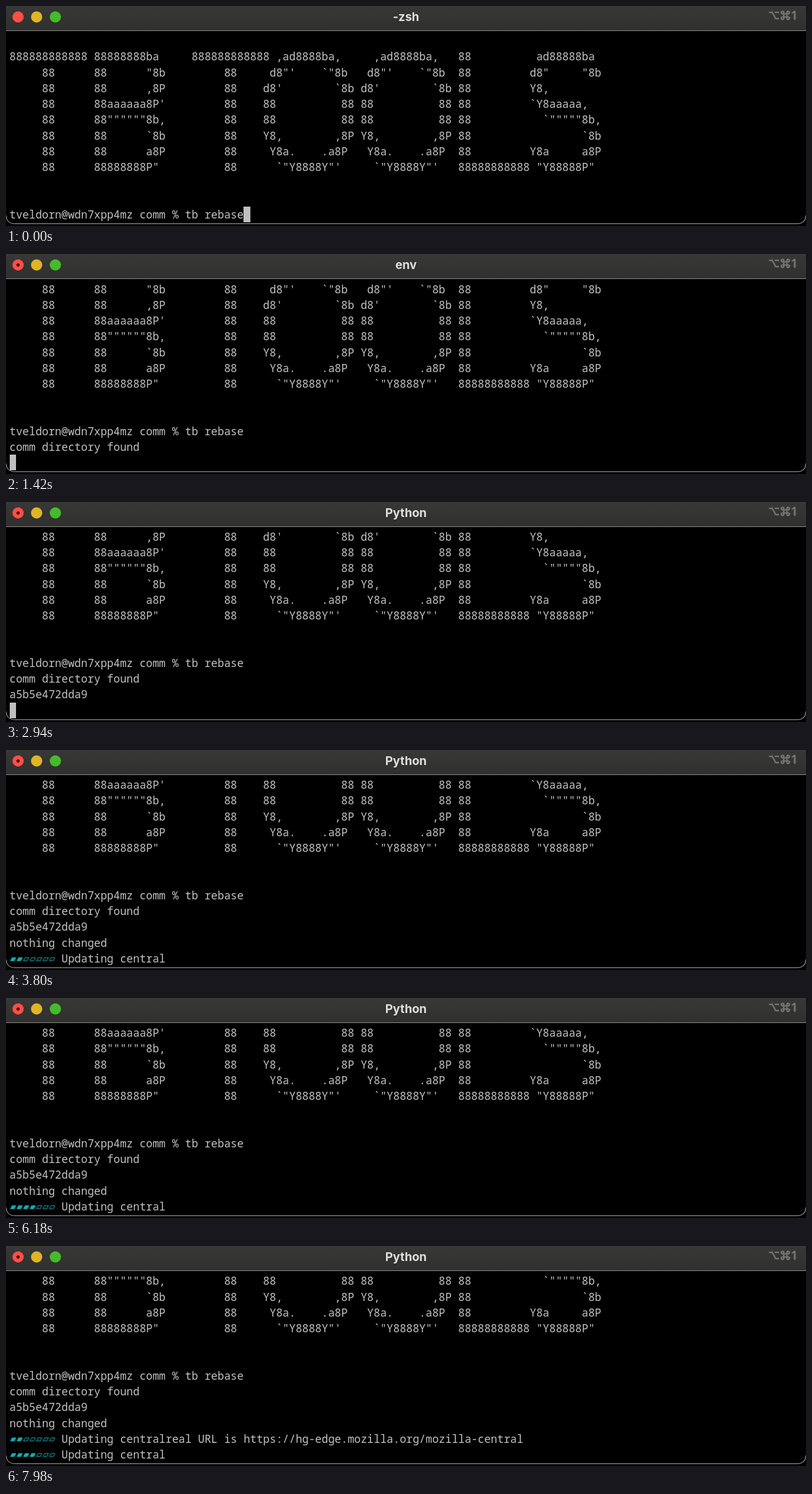
Write an HTML page that moves like this. It is 1280 by 352 pixels and loops after 8 s.

```html
<!DOCTYPE html>
<html lang="en">
<head>
<meta charset="utf-8">
<title>Terminal</title>
<style>
  :root { --row: 25.25px; --grey: #c2c2c2; --cyan: #14a9b5; }
  html, body { margin: 0; width: 100%; height: 100%; overflow: hidden; background: #000; }
  #stage { position: relative; width: 1280px; height: 352px; overflow: hidden; background: #000; }
  #frame { position: absolute; inset: 0; }
  #frame text { font-family: Inter, "Open Sans", sans-serif; font-weight: 700; }
  #term {
    position: absolute; left: 5.5px; top: 43px;
    width: 1268px; height: calc(12 * var(--row)); overflow: hidden;
    font: 17.35px/var(--row) "Noto Sans Mono", "DejaVu Sans Mono", monospace;
    color: var(--grey);
  }
  pre { margin: 0; font: inherit; font-variant-ligatures: none; }
  #tail { position: absolute; left: 0; bottom: 0; width: 100%; height: var(--row); }
  #cursor { position: absolute; top: 0; width: 10.5px; height: 100%; background: #bfbfbf; }
  .bar { width: 72.87px; height: 7px; vertical-align: 2px; overflow: visible; }
  .bar path { fill: none; stroke: var(--cyan); stroke-width: 1; }
  .bar path.on { fill: var(--cyan); }
</style>
</head>
<body>
<div id="stage">
  <svg id="frame" viewBox="0 0 1280 352">
    <defs>
      <linearGradient id="chrome" x2="0" y2="1">
        <stop stop-color="#383836"/>
        <stop offset="1" stop-color="#2f2f2e"/>
      </linearGradient>
    </defs>
    <rect width="1280" height="39" fill="url(#chrome)"/>
    <path d="M0 39.5H1280" stroke="#8c8c8a"/>
    <path d="M0 335Q1 348.3 14 348.3H1266Q1279 348.3 1280 335" fill="none" stroke="#8f8f8d" stroke-width="1.3"/>
    <circle cx="19.3" cy="17.5" r="9" fill="#ff4f45"/>
    <circle id="busy" cx="19.3" cy="17.5" r="2.6" fill="#4a0503"/>
    <circle cx="49" cy="17.5" r="9" fill="#dfb427"/>
    <circle cx="79" cy="17.5" r="9" fill="#43bb2b"/>
    <text id="title" x="640" y="23.6" text-anchor="middle" font-size="19" fill="#dededc">-zsh</text>
    <g fill="none" stroke="#777775" stroke-width="2.2">
      <path d="M1221 10.2H1226L1231.5 20.2H1237M1230 10.2H1237"/>
      <path d="M1244.5 12.5H1249.5V17.5H1244.5ZM1244.5 12.5H1242.5A2 2 0 1 1 1244.5 10.5ZM1249.5 12.5V10.5A2 2 0 1 1 1251.5 12.5ZM1249.5 17.5H1251.5A2 2 0 1 1 1249.5 19.5ZM1244.5 17.5V19.5A2 2 0 1 1 1242.5 17.5Z"/>
    </g>
    <text x="1256.5" y="22" font-size="19" fill="#777775">1</text>
  </svg>
  <div id="term">
<pre id="log">

888888888888 88888888ba     888888888888 ,ad8888ba,     ,ad8888ba,   88          ad88888ba
     88      88      "8b         88     d8"'    `"8b   d8"'    `"8b  88         d8"     "8b
     88      88      ,8P         88    d8'        `8b d8'        `8b 88         Y8,
     88      88aaaaaa8P'         88    88          88 88          88 88         `Y8aaaaa,
     88      88""""""8b,         88    88          88 88          88 88           `"""""8b,
     88      88      `8b         88    Y8,        ,8P Y8,        ,8P 88                 `8b
     88      88      a8P         88     Y8a.    .a8P   Y8a.    .a8P  88         Y8a     a8P
     88      88888888P"          88      `"Y8888Y"'     `"Y8888Y"'   88888888888 "Y88888P"


tveldorn@wdn7xpp4mz comm % tb rebase
comm directory found
a5b5e472dda9
nothing changed
<svg class="bar"></svg> Updating central<span id="url">real URL is https://hg-edge.mozilla.org/mozilla-central</span>
<svg class="bar"></svg> Updating central
</pre>
    <div id="tail"><div id="cursor"></div></div>
  </div>
</div>
<script>
const LOOP = 8000, ROW = 25.25, CELL = 10.41, BLOCKS = 7;
const $ = id => document.getElementById(id);
const title = $('title'), busy = $('busy'), log = $('log');
const url = $('url'), tail = $('tail'), cursor = $('cursor');
const bars = [...document.querySelectorAll('.bar')];

// All events are in ticks.
const ENTER = 8, ENV = 28, PYTHON = 57, SPIN = 77, URL_AT = 161, RESUME = 163;
const SCROLLS = [ENTER, 26, 60, 75, URL_AT];
const SPIN_START = 76.5, SPIN_STEP = 4.8;

for (const bar of bars) {
  bar.innerHTML = Array.from({ length: BLOCKS }, (_, i) =>
    `<path d="M${i * CELL + 1.2} 6.2l2.6 -5h6l-2.6 5z"/>`).join('');
}

// Three ticks pass every 140 ms; the middle one is held longest.
function tickAt(ms) {
  const rest = ms % 140;
  return 3 * Math.floor(ms / 140) + (rest < 20 ? 0 : rest < 120 ? 1 : 2);
}

// The bar fills from 1 to 7, then rests on 1 for one extra step.
function filled(tick) {
  const step = Math.floor(Math.max(0, tick - SPIN_START) / SPIN_STEP) % 8;
  return step === BLOCKS ? 1 : step + 1;
}

function setBar(bar, count) {
  [...bar.children].forEach((block, i) => block.classList.toggle('on', i < count));
}

const show = (el, on) => { el.style.visibility = on ? 'visible' : 'hidden'; };

function draw(tick) {
  const lines = SCROLLS.filter(s => tick >= s).length;
  log.style.transform = `translateY(${-lines * ROW}px)`;
  title.textContent = tick < ENV ? '-zsh' : tick < PYTHON ? 'env' : 'Python';
  show(busy, tick >= ENV);

  // The strip hides the last row until its text has been printed.
  show(tail, tick < SPIN || (tick >= URL_AT && tick < RESUME));
  tail.style.background = tick < ENTER ? 'none' : '#000';
  cursor.style.left = (tick < ENTER ? 36 * CELL : 0) + 'px';
  cursor.style.display = tick < SPIN ? 'block' : 'none';

  show(url, tick >= URL_AT);
  setBar(bars[0], filled(Math.min(tick, URL_AT)));
  setBar(bars[1], filled(tick));
}

let start = null, last = -1;
function loop(now) {
  start ??= now;
  const tick = tickAt((now - start) % LOOP);
  if (tick !== last) draw(last = tick);
  requestAnimationFrame(loop);
}
draw(0);
requestAnimationFrame(loop);
</script>
</body>
</html>
```
